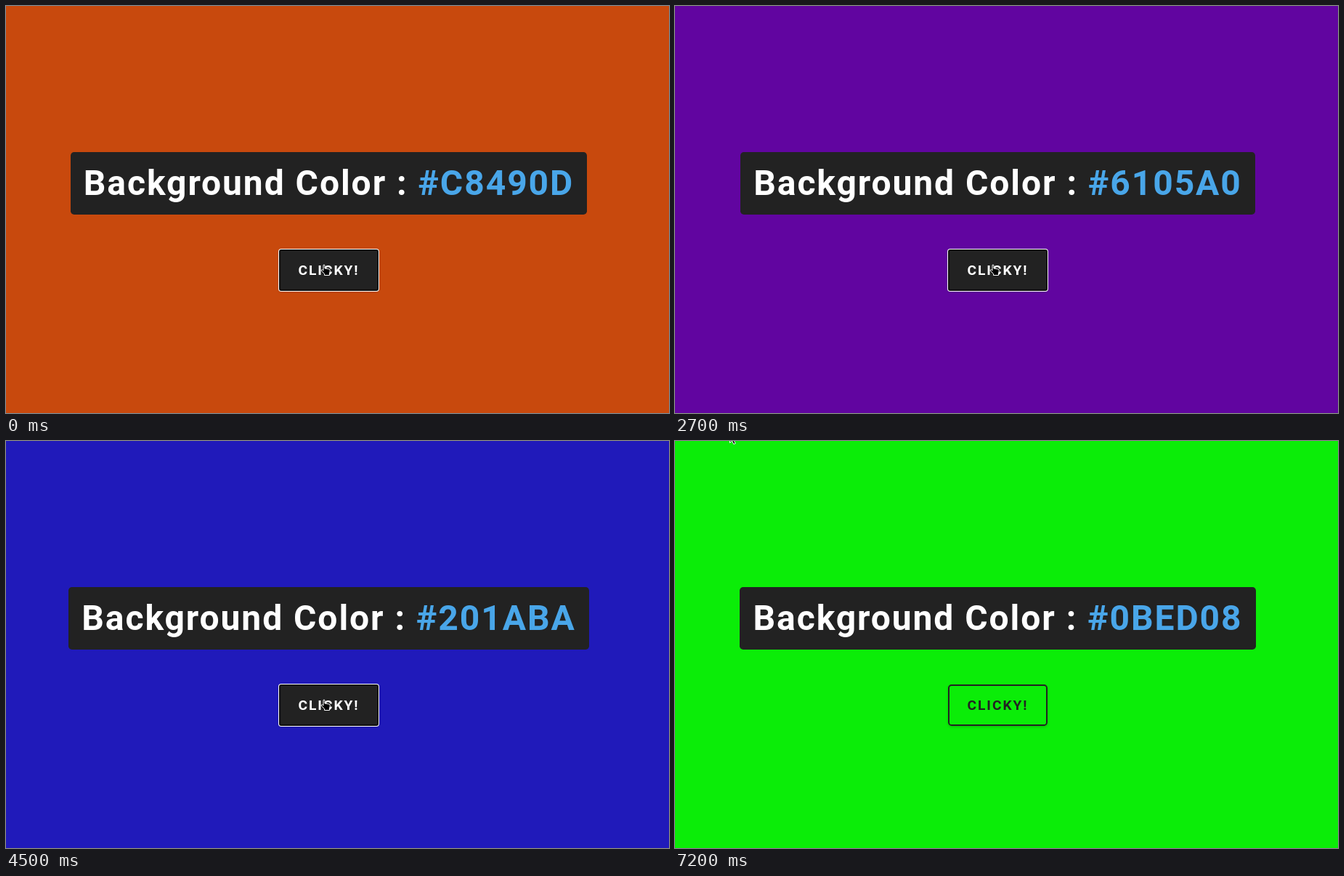
Animation, 913 px wide and 560 px high, one loop 7.5 s. Source, as an HTML page:

```html
<!DOCTYPE html>
<html lang="en">
<head>
<meta charset="utf-8">
<title>Color Flipper</title>
<style>
  html, body { margin: 0; width: 100%; height: 100%; overflow: hidden; }
  body { position: relative; background: #C8490D; font-family: Roboto, sans-serif; font-weight: 700; letter-spacing: 1.92px; }
  main { position: absolute; left: 0; top: 201px; width: 889px; display: flex; flex-direction: column; align-items: center; }
  h2 {
    margin: 0 0 48px; padding: 0 18px; height: 86px; line-height: 86px;
    font-size: 48px; white-space: nowrap;
    color: #fff; background: #222; border-radius: 4.8px;
  }
  h2 span { color: #49a6e9; }
  .btn {
    box-sizing: border-box; width: 137px; height: 57px; line-height: 53px;
    font-size: 19.2px; text-align: center; white-space: nowrap;
    border: 2px solid #222; border-radius: 4.8px;
    box-shadow: 0 1.2px 3.6px rgba(0, 0, 0, .2);
  }
  .btn.focus { border-color: #101010; border-radius: 3px; box-shadow: 0 0 0 1px #fff, 0 1.2px 3.6px rgba(0, 0, 0, .2); }
  svg { position: absolute; left: 0; top: 0; width: 100%; height: 100%; }
  svg path { fill: #000; stroke: #fff; stroke-width: 1; stroke-linejoin: round; }
</style>
</head>
<body>
<main>
  <h2>Background Color : <span id="hex">#C8490D</span></h2>
  <div class="btn focus" id="btn">CLICKY!</div>
</main>
<svg>
  <path id="hand" transform="translate(433 355)"
    d="M4 1.5Q5.2 .3 6 1.8V6L11.5 7Q13.5 7.5 13.3 9.5L12.5 13V15.5H5.5V13.5L1.2 9.2Q.8 7.6 2.6 7.9L4 9Z"/>
  <path id="arrow" d="M.5 .5V14.5L3.6 11.6L5.8 16.4L8.2 15.4L6 10.8H10Z"/>
</svg>
<script>
  const LOOP = 7500, LEAVE = 6300, BLUR = 7200;
  const colors = [
    [0, '#C8490D'], [500, '#3FA97C'], [1000, '#8B5E34'], [1600, '#DDCCE2'],
    [2100, '#47B2D6'], [2700, '#6105A0'], [3300, '#E794A1'], [4000, '#93C24F'],
    [4500, '#201ABA'], [5200, '#D4A02B'], [5800, '#0BED08']
  ];
  // time, x, y of the arrow's tip
  const moves = [[6300, 340, 240], [6400, 225, 115], [6500, 122, -4], [6600, 90, -40], [6900, 75, -12]];
  const $ = id => document.getElementById(id);
  const hex = $('hex'), btn = $('btn'), hand = $('hand'), arrow = $('arrow');
  const latest = (list, t) => list.filter(e => e[0] <= t).pop();

  function draw(t) {
    const color = latest(colors, t)[1];
    document.body.style.background = color;
    if (hex.textContent !== color) hex.textContent = color;

    // hover fades out in four steps
    const hover = t < LEAVE ? 1 : Math.max(0, 1 - (Math.floor((t - LEAVE) / 100) + 1) / 4);
    const ink = 34 + 221 * hover;
    btn.style.background = `rgba(34, 34, 34, ${hover})`;
    btn.style.color = `rgb(${ink}, ${ink}, ${ink})`;
    btn.classList.toggle('focus', t < BLUR);

    const move = latest(moves, t);
    hand.style.display = move ? 'none' : '';
    arrow.style.display = move ? '' : 'none';
    if (move) arrow.setAttribute('transform', `translate(${move[1]} ${move[2]})`);
  }

  const start = performance.now();
  function tick() {
    draw((performance.now() - start) % LOOP);
    requestAnimationFrame(tick);
  }
  draw(0);
  requestAnimationFrame(tick);
</script>
</body>
</html>
```
